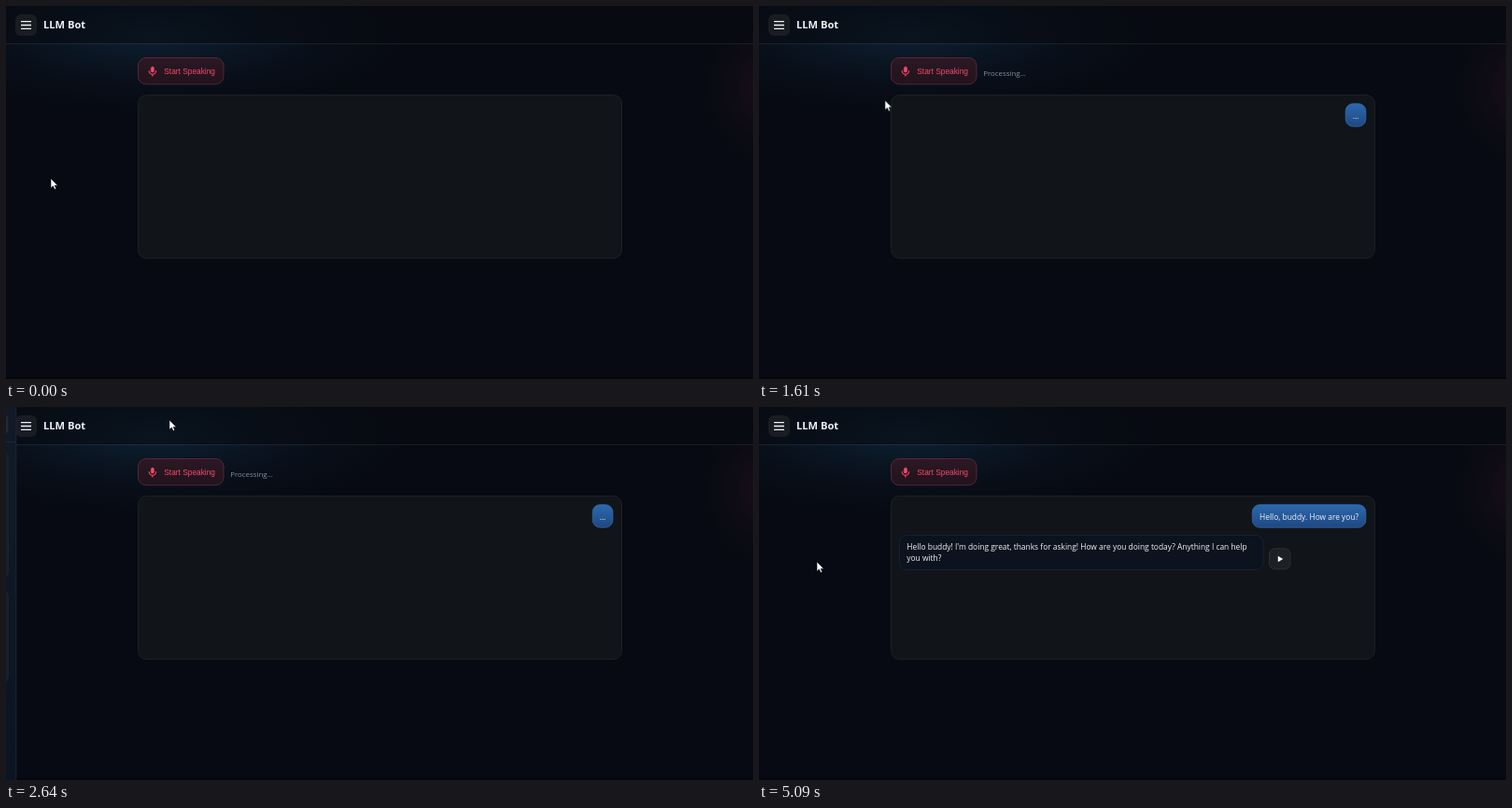
Write an HTML page that moves like this. It is 800x400 px and loops after 5.12 s.

```html
<!DOCTYPE html>
<html lang="en">
<head>
<meta charset="utf-8">
<title>LLM Bot</title>
<style>
html, body { margin: 0; width: 100%; height: 100%; overflow: hidden; background: #070a12; }
svg { display: block; width: 100%; height: 100%; }
text { font-family: "Open Sans", "Noto Sans", sans-serif; fill: #eef1f6; white-space: pre; }
.ui { font: 8.33px "Liberation Sans", Arial, sans-serif; }
.msg { font-size: 8.42px; }
.hint { font-size: 7.88px; fill: #878c99; }
.title { font-size: 11.15px; font-weight: 700; }
.label { font-size: 7.65px; font-weight: 700; }
.tools { font-size: 8.1px; letter-spacing: 1.3px; fill: #8790a0; }
.time { font-size: 8.75px; fill: #202124; }

/* hard state changes */
.idle, .live, .wait, .dots, .chat, .arrow, .hand { animation: 5120ms step-end infinite; }
.idle { animation-name: idle; }
.live { animation-name: live; }
.wait { animation-name: wait; }
.dots { animation-name: dots; }
.chat { animation-name: chat; }
.arrow { animation-name: arrow; }
.hand { animation-name: hand; }
@keyframes idle { 0% { visibility: visible } 8.8% { visibility: hidden } 26% { visibility: visible } }
@keyframes live { 0% { visibility: hidden } 8.8% { visibility: visible } 26% { visibility: hidden } }
@keyframes wait { 0% { visibility: hidden } 26% { visibility: visible } 58.6% { visibility: hidden } }
@keyframes dots { 0% { visibility: hidden } 8.8% { visibility: visible } 58.6% { visibility: hidden } }
@keyframes chat { 0% { visibility: hidden } 58.6% { visibility: visible } }
@keyframes arrow {
  0%, 27.3%, 40.8%, 49.6% { visibility: visible }
  6.4%, 36.9%, 47.5% { visibility: hidden }
}
@keyframes hand {
  0%, 27.3%, 40.8%, 49.6% { visibility: hidden }
  6.4%, 36.9%, 47.5% { visibility: visible }
}

.drawer { animation: drawer 5120ms ease infinite; }
@keyframes drawer {
  0%, 38.3% { transform: translateX(-189px) }
  43.2%, 48.24% { transform: translateX(0) }
  53.1%, 100% { transform: translateX(-189px) }
}

.pointer { animation: pointer 5120ms ease-in-out infinite; }
@keyframes pointer {
  0%, .5% { transform: translate(48px, 185px) }
  7.6%, 25.4% { transform: translate(201px, 70px) }
  25.4% { animation-timing-function: ease-in }
  31.4% { transform: translate(136px, 102px); animation-timing-function: linear }
  35.5% { transform: translate(67px, 52px); animation-timing-function: ease-out }
  37.7%, 40% { transform: translate(21px, 19px) }
  44.3%, 46.4% { transform: translate(129px, 77px) }
  47.8%, 49.8% { transform: translate(167px, 18px) }
  51.6% { transform: translate(175px, 14px); animation-timing-function: ease-in }
  56.8% { transform: translate(500px, 130px); animation-timing-function: ease-out }
  59.8% { transform: translate(590px, 190px) }
  65.4%, 67.6% { transform: translate(563px, 124px) }
  74%, 78% { transform: translate(254px, 150px) }
  79.9%, 85.4% { transform: translate(162px, 152px) }
  92.8%, 100% { transform: translate(62px, 166px) }
}
</style>
</head>
<body>
<svg viewBox="0 0 800 400" preserveAspectRatio="none">
  <defs>
    <radialGradient id="blueGlow"><stop stop-color="#123049" stop-opacity=".62"/><stop offset="1" stop-color="#0b1a2a" stop-opacity="0"/></radialGradient>
    <radialGradient id="redGlow"><stop stop-color="#2a1224" stop-opacity=".6"/><stop offset="1" stop-color="#1a0d18" stop-opacity="0"/></radialGradient>
    <linearGradient id="bubble" x2="0" y2="1"><stop stop-color="#2d69ae"/><stop offset="1" stop-color="#1e4882"/></linearGradient>
    <linearGradient id="rose" x2="0" y2="1"><stop stop-color="#2b1823"/><stop offset="1" stop-color="#21131d"/></linearGradient>
    <linearGradient id="side" x2="0" y2="1"><stop stop-color="#111a26"/><stop offset="1" stop-color="#0b1522"/></linearGradient>
    <g id="mic" fill="none" stroke="currentColor" stroke-width="1.1" stroke-linecap="round">
      <rect x="155.3" y="65.2" width="3.2" height="5.8" rx="1.6" fill="currentColor" stroke-width=".6"/>
      <path d="M153.2 69.6a3.7 3.7 0 0 0 7.4 0M156.9 73.4v1.7"/>
    </g>
    <g id="player">
      <rect x="16.6" y="140" width="154" height="33.8" rx="16.9" fill="#f1f3f4"/>
      <path d="M30.5 153.2v7.4l6-3.7z" fill="#a9abae"/>
      <text class="ui time" x="46" y="160">0:00 / 0:00</text>
      <rect x="97" y="155.8" width="17.4" height="2.4" rx="1.2" fill="#c3c5c8"/>
      <path d="M129.3 155.2h2.2l2.8-2.7v8.8l-2.8-2.7h-2.2z" fill="#9fa1a5"/>
      <path d="M135.8 154.8q1.8 2.1 0 4.2M136 152.6q5.2 4.3 0 8.6" fill="none" stroke="#9fa1a5"/>
      <g fill="#202124"><circle cx="154.2" cy="153.4" r="1.2"/><circle cx="154.2" cy="157" r="1.2"/><circle cx="154.2" cy="160.6" r="1.2"/></g>
    </g>
  </defs>

  <rect width="800" height="400" fill="#070a12"/>
  <ellipse cx="160" cy="30" rx="270" ry="82" fill="url(#blueGlow)"/>
  <ellipse cx="815" cy="88" rx="72" ry="85" fill="url(#redGlow)"/>
  <rect width="800" height="40" fill="#070a12" opacity=".6"/>
  <path d="M0 40.5H800" stroke="#fff" stroke-opacity=".07"/>
  <path d="M0 399H800" stroke="#04060b" stroke-width="2"/>

  <rect x="10" y="9" width="23" height="23" rx="6" fill="#191d22"/>
  <path d="M16 16.6H27M16 20.5H27M16 24.4H27" stroke="#eef1f6" stroke-width="1.3"/>
  <text class="title" x="40" y="24.4">LLM Bot</text>

  <rect x="141.5" y="95.5" width="518" height="175" rx="9" fill="#111519" stroke="#1b2025"/>

  <g class="idle" color="#f5496a">
    <rect x="141.5" y="55.5" width="91.5" height="28.3" rx="8.5" fill="url(#rose)" stroke="#562538"/>
    <use href="#mic"/>
    <text class="ui" x="169.3" y="72.8" style="fill:#f5496a">Start Speaking</text>
  </g>
  <g class="live" color="#58a6f5">
    <rect x="139.6" y="53.6" width="95.2" height="32" rx="9.5" fill="#102035" stroke="#22446d" stroke-width="4"/>
    <use href="#mic"/>
    <text class="ui" x="169.3" y="72.8" style="fill:#58a6f5">Stop Speaking</text>
    <text class="hint" x="240" y="75">Listening...</text>
  </g>
  <text class="hint wait" x="240.3" y="75">Processing...</text>

  <g class="dots">
    <rect x="628.2" y="104.7" width="21.7" height="24.5" rx="8" fill="url(#bubble)" stroke="#3270b4" stroke-width=".7"/>
    <text class="msg" x="639" y="120.6" text-anchor="middle">...</text>
  </g>

  <g class="chat">
    <rect x="528.3" y="104.7" width="121.6" height="24.5" rx="8" fill="url(#bubble)" stroke="#3270b4" stroke-width=".7"/>
    <text class="msg" x="536" y="120.6">Hello, buddy. How are you?</text>
    <rect x="150.5" y="137.5" width="389.5" height="37" rx="8" fill="#0c131e" stroke="#132036"/>
    <text class="msg" x="158.3" y="153">Hello buddy! I'm doing great, thanks for asking! How are you doing today? Anything I can help</text>
    <text class="msg" x="158.3" y="165.2">you with?</text>
    <rect x="546.5" y="151.8" width="22.5" height="22" rx="6" fill="#1d2125" stroke="#2b2f34"/>
    <path d="M555.8 159.8v6.4l5.4-3.2z" fill="#fff"/>
  </g>

  <g class="drawer">
    <rect width="187.5" height="400" fill="url(#side)"/>
    <path d="M187.5 0V400M0 37.5H187.5" stroke="#1c2631"/>
    <text class="tools" x="8.8" y="22.6">TOOLS</text>
    <rect x="156" y="7.5" width="22.7" height="22.5" rx="6" fill="#222831" stroke="#2a313b" stroke-width=".7"/>
    <path d="M165.7 17.3l3.2 3.2m0-3.2l-3.2 3.2" stroke="#fff" stroke-width="1.1"/>
    <g fill="#161e28" stroke="#1c2530">
      <rect x="8.5" y="46.5" width="170.5" height="138" rx="7.5"/>
      <rect x="8.5" y="195.5" width="170.5" height="101" rx="7.5"/>
    </g>
    <text class="label" x="16.8" y="65.8">Text to Speech</text>
    <rect x="16.8" y="74.8" width="153.8" height="22" rx="6.5" fill="#0b1119" stroke="#151d27"/>
    <text class="ui" x="24.6" y="88.7" style="fill:#737880">Type text...</text>
    <g fill="#282e38" stroke="#373e48">
      <rect x="16.8" y="110.5" width="49.4" height="20.5" rx="6.5"/>
      <rect x="16.8" y="222.8" width="72" height="20.5" rx="6.5"/>
    </g>
    <text class="ui" x="24.6" y="123.7">Generate</text>
    <use href="#player"/>
    <text class="label" x="16.8" y="214.6">Echo Bot</text>
    <text class="ui" x="24.6" y="236">Start Recording</text>
    <use href="#player" y="112.2"/>
  </g>

  <g class="pointer" fill="#fff" stroke="#10131a" stroke-width=".6" stroke-linejoin="round">
    <path class="arrow" d="M0 0V10.2L2.4 8 4 11.6 5.7 10.9 4.2 7.4H7.4Z"/>
    <path class="hand" d="M-1 .5Q0-.8 1 .5V4.6L5.2 5.4Q6.7 5.8 6.5 7.4L5.6 10.6V12.3H-.4V10.8L-3.4 7.3Q-3.5 5.8-2.2 6.2L-1 7.2Z"/>
  </g>
</svg>
</body>
</html>
```
